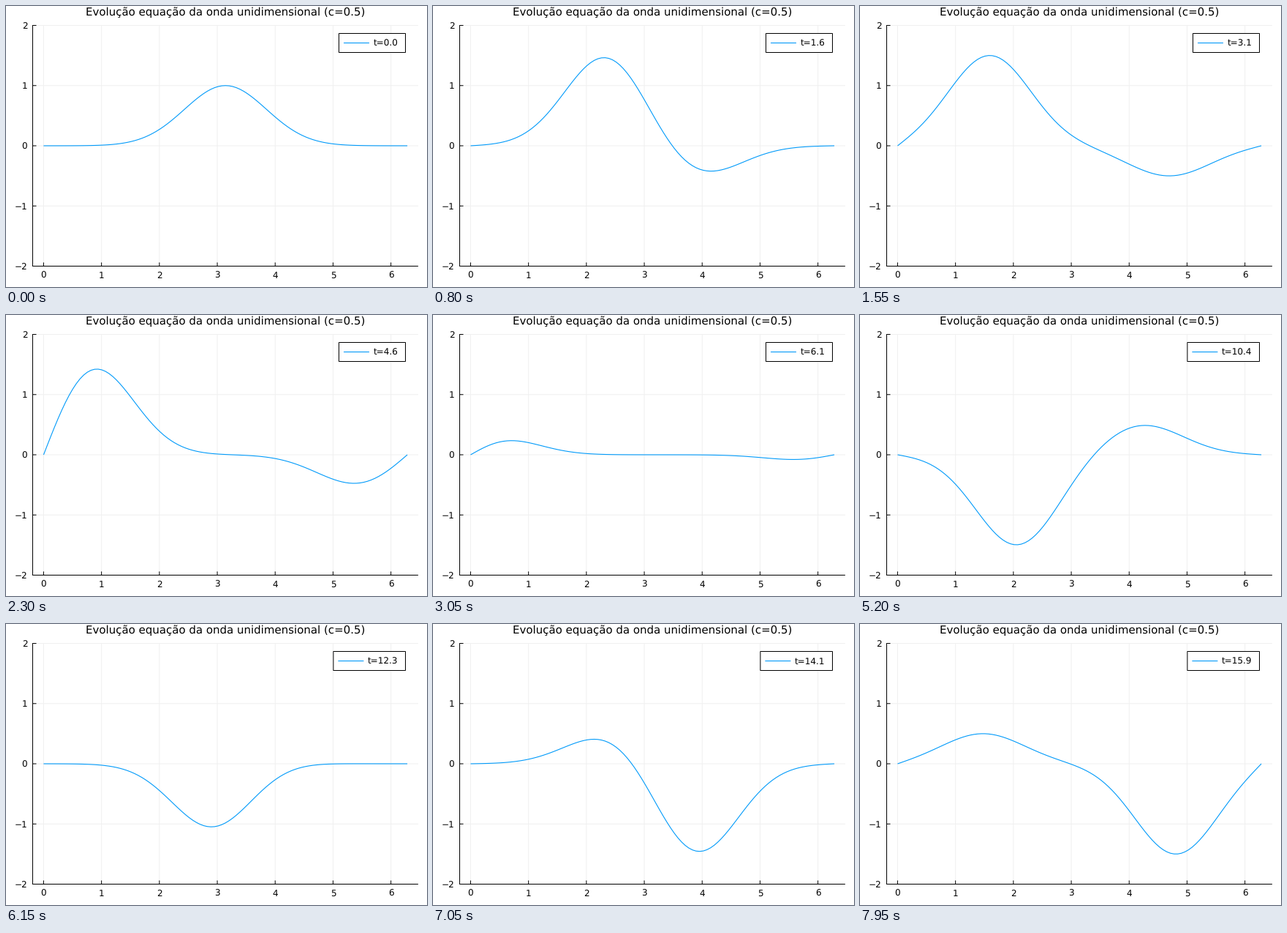
Animation of 576x384 px, one loop 8000 ms. Source, as a matplotlib script:

```python
import numpy as np
import matplotlib
import matplotlib.pyplot as plt
from matplotlib.animation import FuncAnimation
from matplotlib.patches import Rectangle

W, H, DPI = 576, 384, 100
FRAMES, INTERVAL = 160, 50
SPEED = 0.5
LENGTH = 2 * np.pi
BLUE = "#009AFA"
LEFT, RIGHT, TOP, BOTTOM = 36.5, 564, 26.5, 355.5
PX = 72 / DPI  # points per pixel

matplotlib.rcParams["font.family"] = "DejaVu Sans"
matplotlib.rcParams["text.hinting"] = "none"
matplotlib.rcParams["text.hinting_factor"] = 1

fig = plt.figure(figsize=(W / DPI, H / DPI), dpi=DPI, facecolor="white")
ax = fig.add_axes([0, 0, 1, 1])
ax.set_xlim(0, W)
ax.set_ylim(H, 0)
ax.axis("off")


def to_x(v):
    return 51.45 + 79.2 * v


def to_y(v):
    return 191 - 82.25 * v


def line(xs, ys, color="black", width=1.0, **kw):
    return ax.plot(xs, ys, color=color, lw=width * PX, snap=False,
                   solid_capstyle="butt", **kw)[0]


def label(x, y, s, size=12, ha="center"):
    return ax.text(x, y, s, fontsize=size * PX, ha=ha, va="baseline")


def minus(v):
    return str(v).replace("-", "\u2212")


for v in range(7):
    line([to_x(v)] * 2, [TOP, BOTTOM], "#F0F0F0")
for v in range(-2, 3):
    line([LEFT, RIGHT], [to_y(v)] * 2, "#F0F0F0")

line([LEFT - 0.5, RIGHT], [BOTTOM] * 2)
line([LEFT] * 2, [TOP - 0.5, BOTTOM + 0.5])
for v in range(7):
    line([to_x(v)] * 2, [BOTTOM - 5, BOTTOM])
    label(to_x(v), 371.5, minus(v))
for v in range(-2, 3):
    line([LEFT, LEFT + 5], [to_y(v)] * 2)
    label(29.3, to_y(v) + 4.5, minus(v), ha="right")

label(300.3, 13, "Evolução equação da onda unidimensional (c=0.5)", 14.68)


def images(x, sign):
    """Gaussian pulse mirrored about both ends, odd (-1) or even (+1)."""
    total = 0
    for k in range(-2, 3):
        shift = 2 * LENGTH * k
        total = total + np.exp(-(x - np.pi - shift) ** 2)
        total = total + sign * np.exp(-(x + np.pi - shift) ** 2)
    return total


def wave(x, t):
    """String with fixed ends, started with velocity f'(x)."""
    ahead, behind = x + SPEED * t, x - SPEED * t
    shape = (images(ahead, -1) + images(behind, -1)) / 2
    push = images(ahead, 1) - images(behind, 1)
    return shape + push


grid = np.linspace(0, LENGTH, 101)
curve = line(to_x(grid), to_y(wave(grid, 0)), BLUE, 1.1, zorder=3)

box = Rectangle((455.5, 37.5), 91, 26, fc="white", ec="black",
                lw=PX, snap=False, zorder=4)
ax.add_patch(box)
sample = line([462, 497], [50.5, 50.5], BLUE, 1.1, zorder=5)
clock = label(502.5, 55, "t=0.0", ha="left")
clock.set_zorder(5)


def update(n):
    t = n / 10
    curve.set_ydata(to_y(wave(grid, t)))
    left = 455.5 if t < 10 else 447.9
    box.set_x(left)
    box.set_width(546.5 - left)
    sample.set_xdata([left + 6.5, left + 41.5])
    clock.set_x(left + 47)
    clock.set_text(f"t={t:.1f}")
    return curve, box, sample, clock


anim = FuncAnimation(fig, update, frames=FRAMES, interval=INTERVAL,
                     repeat=True, repeat_delay=0, blit=False)
plt.show()
```
